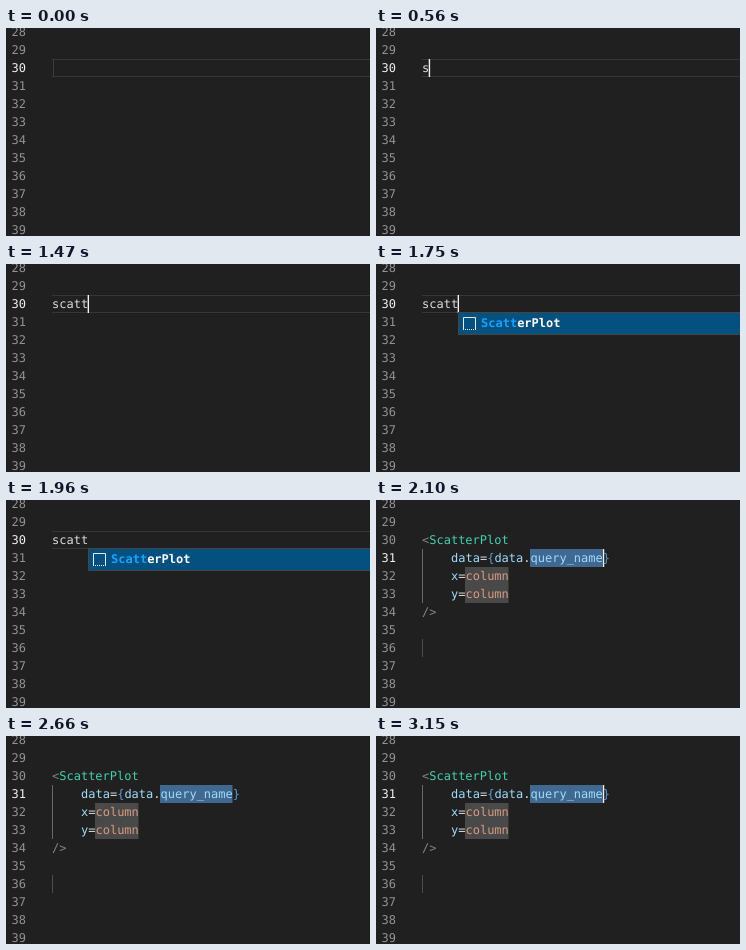
Recreate the animation shown at these times as an HTML page. Size 364 by 208 pixels, loop 3.29 s.

```html
<!DOCTYPE html>
<html lang="en">
<head>
<meta charset="utf-8">
<title>Snippet completion</title>
<style>
  html, body { margin: 0; width: 100%; height: 100%; overflow: hidden; background: #202020; }
  svg { display: block; width: 364px; height: 208px; }
  text { font: 12px "DejaVu Sans Mono", monospace; text-rendering: geometricPrecision; white-space: pre; fill: #dcdcdc; }
  #numbers text { fill: #929292; }
  #numbers .active { fill: #f0f0f0; }
  .punct { fill: #858585; }
  .tag { fill: #45cfae; }
  .attr { fill: #9cdcfe; }
  .brace { fill: #569cd6; }
  .value { fill: #d79a80; }
  .match { fill: #18a3ff; font-weight: bold; }
  .field { fill: #494949; }
</style>
</head>
<body>
<svg viewBox="0 0 364 208">
  <g id="numbers"></g>

  <g id="typing">
    <path d="M46 31.5H364M46 48.5H364" stroke="#363636"/>
    <path id="edge" d="M47.5 31V49" stroke="#3c3c3c"/>
    <text id="typed" x="46" y="44"></text>
  </g>

  <g id="snippet">
    <path d="M46.5 49V103" stroke="#686868"/>
    <path d="M46.5 139V157" stroke="#4c4c4c"/>
    <rect x="154" y="49" width="72.5" height="18" fill="#406890"/>
    <rect class="field" x="89" y="67" width="43.5" height="18"/>
    <rect class="field" x="89" y="85" width="43.5" height="18"/>
    <text x="46" y="44"><tspan class="punct">&lt;</tspan><tspan class="tag">ScatterPlot</tspan></text>
    <text x="75" y="62"><tspan class="attr">data</tspan>=<tspan class="brace">{</tspan><tspan class="attr">data</tspan>.<tspan class="attr">query_name</tspan><tspan class="brace">}</tspan></text>
    <text x="75" y="80"><tspan class="attr">x</tspan>=<tspan class="value">column</tspan></text>
    <text x="75" y="98"><tspan class="attr">y</tspan>=<tspan class="value">column</tspan></text>
    <text x="46" y="116" class="punct">/&gt;</text>
  </g>

  <rect id="cursor" width="1.4" height="18" fill="#f0f0f0"/>

  <g id="popup">
    <rect x="82.5" y="48.5" width="300" height="22" fill="#04507f" stroke="#454545"/>
    <path d="M87.5 65V53.5H99.5V65" fill="none" stroke="#e8e8e8"/>
    <path d="M87 65.5H100" stroke="#e8e8e8" stroke-dasharray="1 1"/>
    <text x="105" y="63" fill="#fff"><tspan class="match">Scatt</tspan><tspan fill="#fff" font-weight="bold">erPlot</tspan></text>
  </g>
</svg>
<script>
  const LOOP = 3290, LEFT = 46, TOP = 31, ROW = 18, ADVANCE = 7.224;
  const WORD = "scatt", KEY_TIMES = [560, 770, 980, 1260, 1470];
  const POPUP_AT = 1750, INSERT_AT = 2100;
  const CURSOR_SPANS = [[350, 1960], [2100, 2660], [3150, LOOP]];

  const $ = id => document.getElementById(id);
  const show = (id, on) => $(id).setAttribute("visibility", on ? "visible" : "hidden");

  const numbers = {};
  for (let n = 28; n <= 39; n++) {
    const label = document.createElementNS("http://www.w3.org/2000/svg", "text");
    label.setAttribute("x", 5.5);
    label.setAttribute("y", 44 + (n - 30) * ROW);
    label.textContent = n;
    numbers[n] = $("numbers").appendChild(label);
  }

  function render(t) {
    const inserted = t >= INSERT_AT;
    const count = KEY_TIMES.filter(time => t >= time).length;

    $("typed").textContent = WORD.slice(0, count);
    show("typing", !inserted);
    show("edge", !inserted && count === 0);
    show("popup", t >= POPUP_AT && !inserted);
    show("snippet", inserted);
    numbers[30].classList.toggle("active", !inserted);
    numbers[31].classList.toggle("active", inserted);

    const x = inserted ? 226.8 : Math.max(LEFT + 0.4, LEFT - 0.5 + count * ADVANCE);
    $("cursor").setAttribute("x", x);
    $("cursor").setAttribute("y", inserted ? TOP + ROW : TOP);
    show("cursor", CURSOR_SPANS.some(([from, to]) => t >= from && t < to));
  }

  function tick() {
    render(performance.now() % LOOP);
    requestAnimationFrame(tick);
  }
  tick();
</script>
</body>
</html>
```
